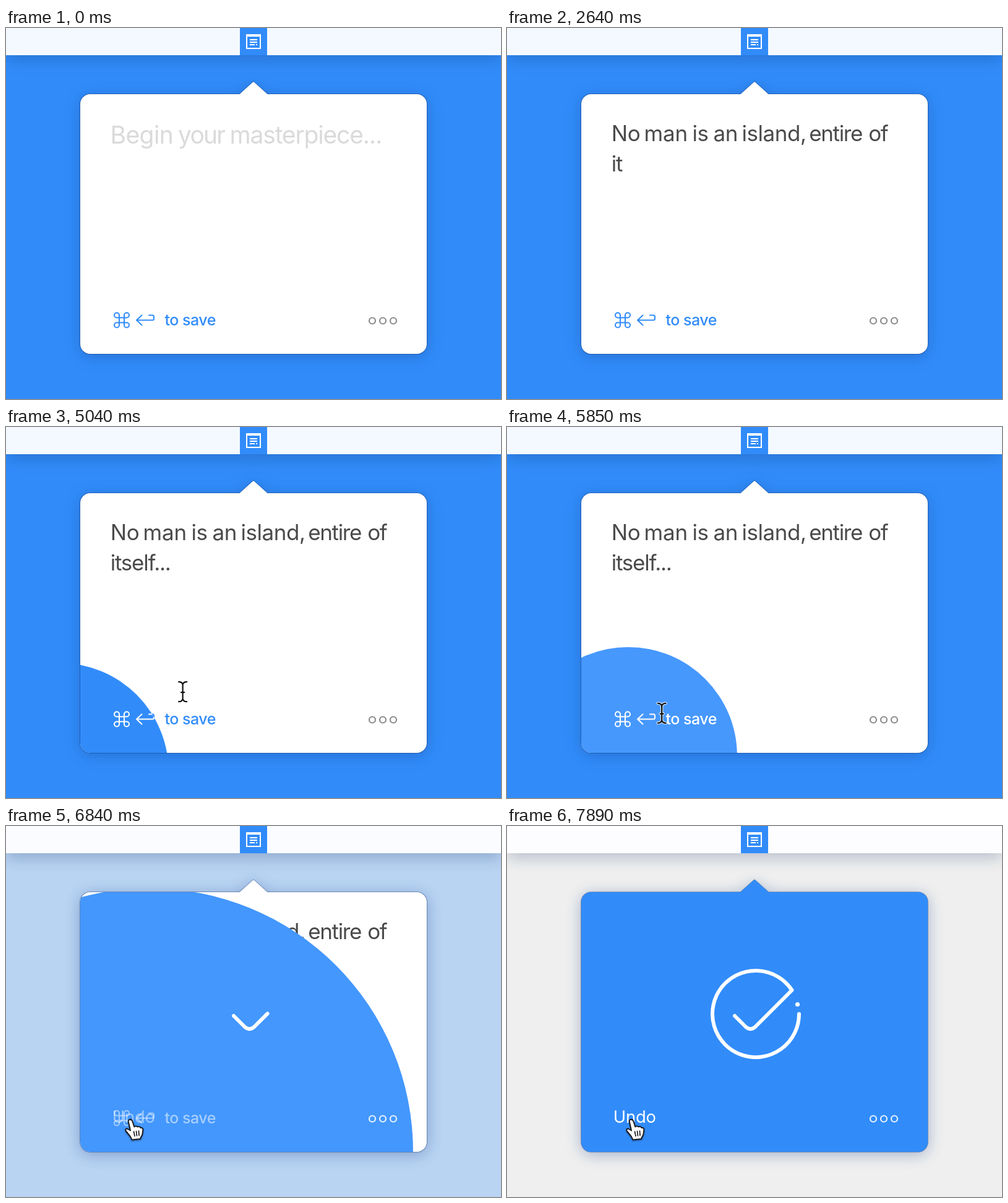
Recreate the animation shown at these times as an HTML page. Size 800 by 600 pixels, loop 9 s.

```html
<!DOCTYPE html>
<html lang="en">
<head>
<meta charset="utf-8">
<title>Quick note</title>
<style>
html, body { margin: 0; width: 100%; height: 100%; overflow: hidden; background: #318cfa; }
svg { display: block; width: 100%; height: 100%; }
text { font-family: Inter, "Liberation Sans", sans-serif; font-optical-sizing: none; white-space: pre; }
.line { fill: none; stroke: currentColor; stroke-width: 2; }
.round { stroke-linecap: round; stroke-linejoin: round; }
</style>
</head>
<body>
<svg viewBox="0 0 800 600" xmlns="http://www.w3.org/2000/svg">
  <defs>
    <path id="shape" d="M136 107H377.500L398.500 88Q400 86.500 401.500 88L422.500 107H664A16 16 0 0 1 680 123V511A16 16 0 0 1 664 527H136A16 16 0 0 1 120 511V123A16 16 0 0 1 136 107Z"/>
    <clipPath id="inCard"><use href="#shape"/></clipPath>
    <clipPath id="inDisc"><circle id="hole"/></clipPath>
    <filter id="soft" filterUnits="userSpaceOnUse" x="-60" y="-60" width="920" height="720">
      <feGaussianBlur stdDeviation="12"/>
    </filter>
    <filter id="lift" x="-50%" y="-50%" width="200%" height="200%">
      <feDropShadow dx="0" dy="1.5" stdDeviation="1.2" flood-opacity=".35"/>
    </filter>
    <g id="save">
      <path class="line" style="stroke-width:1.5" transform="translate(171 456.500) scale(1.3333)" d="M18 3a3 3 0 0 0-3 3v12a3 3 0 1 0 3-3H6a3 3 0 1 0 3 3V6a3 3 0 1 0-3 3h12a3 3 0 0 0 0-6z"/>
      <path class="line round" d="M219.500 464.500L211 472.500L219.500 480.500M211 472.500H236.500Q239 472.500 239 470V467Q239 464.500 236.500 464.500H231"/>
      <g fill="currentColor" font-size="25" font-weight="500" letter-spacing="-.02em">
        <text x="256.500" y="481">to</text><text x="285" y="481">save</text>
      </g>
    </g>
    <g id="more" class="line" style="stroke-width:2.200">
      <circle cx="592" cy="473.500" r="5"/><circle cx="609" cy="473.500" r="5"/><circle cx="626" cy="473.500" r="5"/>
    </g>
  </defs>

  <rect id="back" width="800" height="600"/>
  <rect y="8" width="800" height="44" fill="#0a2a5c" opacity=".24" filter="url(#soft)"/>
  <rect id="bar" width="800" height="44"/>
  <rect x="378" width="44" height="44" fill="#318cfa"/>
  <g fill="#fff">
    <path fill-rule="evenodd" d="M388 10H412V34H388ZM390 14V32H410V14Z"/>
    <path d="M394 18h12v2h-12zM394 22h12v2h-12zM394 26h8v2h-8zM404 26h2v2h-2z"/>
  </g>

  <use href="#shape" y="4" fill="#123c86" opacity=".36" filter="url(#soft)"/>
  <use href="#shape" fill="none" stroke="#0a3272" stroke-opacity=".5" stroke-width="1.600"/>
  <use id="card" href="#shape"/>

  <g id="hint" fill="#dadada" font-size="39">
    <text x="168.500" y="187" letter-spacing="-.015em">Begin</text>
    <text x="278" y="187" letter-spacing="-.045em">your</text>
    <text x="361.500" y="187" letter-spacing="-.030em">masterpiece...</text>
  </g>
  <g id="note" fill="#4a4a4a" font-size="35"></g>
  <rect id="caret" width="2.400" fill="#6a6a6a"/>
  <use href="#save" color="#318cfa"/>
  <use href="#more" color="#8c8c8c"/>

  <g clip-path="url(#inCard)">
    <circle id="disc"/>
    <g clip-path="url(#inDisc)" color="#fff">
      <use id="saveLit" href="#save"/>
      <text id="undo" x="171.800" y="480" font-size="27.500" fill="#fff" letter-spacing="-.01em">Undo</text>
      <use href="#more" opacity=".88"/>
    </g>
  </g>

  <path id="tick" class="round" fill="none" stroke="#fff" stroke-width="6" d="M368 307L386 325Q393.500 331.500 401 325L460.500 265.500A70 70 0 1 0 472 304"/>
  <circle id="dot" cx="469.500" cy="288.500" fill="#fff"/>
  <path id="spark" class="round" fill="none" stroke="#fff" stroke-width="2.500"/>

  <g id="beam" fill="none" stroke-linecap="round">
    <path id="beamPath" stroke="#fff" stroke-width="4.500" stroke-opacity=".8" d="M-6.500-16Q-1-16 0-11.500Q1-16 6.500-16M0-11.500V11.500M-6.500 16Q-1 16 0 11.500Q1 16 6.500 16M-2.500 1H2.500"/>
    <use href="#beamPath" id="beamInk"/>
    <path stroke="#111" stroke-width="2.200" d="M-6.500-16Q-1-16 0-11.500Q1-16 6.500-16M0-11.500V11.500M-6.500 16Q-1 16 0 11.500Q1 16 6.500 16M-2.500 1H2.500"/>
  </g>
  <g id="hand" class="round" filter="url(#lift)" stroke="#1b1b22">
    <path fill="#fff" stroke-width="2" d="M-3 2Q-4-2-.500-2.500Q2.500-2.500 3.500 1L6.300 9.500Q9 7 11.500 9.500Q15 8 16.500 11Q20 10.500 20.500 14L19.500 21Q18.500 25 16.500 27V29L2.500 30.500Q1 26 -3 21.500L-7.500 16Q-8.500 12.500-5 12.500L0 15.500Z"/>
    <path fill="none" stroke-width="1.700" d="M5.500 17L7 24.500M9.500 16.500L10.500 24M13.500 16L14 23.500"/>
  </g>
</svg>
<script>
const $ = id => document.getElementById(id);
const LOOP = 9000, R = 176;
const BLUE = [49, 140, 250], LIGHT = [83, 160, 255];

const clamp = v => Math.max(0, Math.min(1, v));
const span = (t, a, b) => clamp((t - a) / (b - a));
const mix = (a, b, p) => a + (b - a) * p;
const blend = (a, b, p) => a.map((v, i) => mix(v, b[i], p));
const rgb = c => `rgb(${c.map(Math.round)})`;
const outQuad = p => 1 - (1 - p) ** 2;
const inOut = p => (1 - Math.cos(Math.PI * p)) / 2;
const outBack = p => 1 + 3.600 * (p - 1) ** 3 + 2.600 * (p - 1) ** 2;

function set(id, attrs) {
  for (const k in attrs) $(id).setAttribute(k, attrs[k]);
}

// piecewise linear: keys are [time, value]
function track(t, keys) {
  if (t < keys[0][0]) return 0;
  for (let i = 1; i < keys.length; i++) {
    const [t0, v0] = keys[i - 1], [t1, v1] = keys[i];
    if (t < t1) return mix(v0, v1, (t - t0) / (t1 - t0));
  }
  return keys[keys.length - 1][1];
}

// word, x, y, tracking in em
const words = [
  ["No", 0, 0, -.01], ["man", 52.7, 0, -.005], ["is", 130.7, 0, -.01], ["an", 164.7, 0, -.01],
  ["island,", 210.7, 0, -.013], ["entire", 319.5, 0, -.04], ["of", 415.4, 0, -.04], ["itself...", 0, 48.5, -.036]
].map(([word, x, y, gap]) => {
  const node = document.createElementNS("http://www.w3.org/2000/svg", "text");
  node.setAttribute("x", x);
  node.setAttribute("y", y);
  node.setAttribute("letter-spacing", gap + "em");
  $("note").append(node);
  return { word, node };
});
const typing = [[750, 1], [1620, 14], [1680, 15], [2580, 32], [2640, 33], [2990, 40]];
const tickLength = $("tick").getTotalLength();

function drawText(t) {
  const out = span(t, 90, 540);
  set("hint", { transform: `translate(${170 * outQuad(out)} 0)`, opacity: 1 - out });

  let left = Math.floor(track(t, typing) + .001);
  for (const { word, node } of words) {
    node.textContent = word.slice(0, Math.max(0, left));
    left -= word.length + 1;
  }
  const shrink = inOut(span(t, 2250, 2370));
  set("note", { transform: `translate(168.8 ${mix(185, 183, shrink)}) scale(${mix(40 / 36, 1, shrink)})` });

  if (t < 750) {
    set("caret", { x: 172, y: 151 + 41 * (outBack(out) - 1), height: 44, opacity: clamp(out * 3) });
  } else {
    const on = span(t, 3030, 3090) - span(t, 3270, 3360) + span(t, 3630, 3720) - span(t, 3900 + 30, 3990);
    set("caret", { x: 275, y: 197.5, height: 41, opacity: on });
  }
}

function drawPointer(t) {
  const a = outQuad(span(t, 4170, 4620)), b = outQuad(span(t, 4890, 5280)), c = inOut(span(t, 5700, 6090));
  const x = mix(mix(mix(297, 305, a), 274, b), 201, c);
  const y = mix(mix(mix(340, 382, a), 456, b), 477, c);
  const over = c > .45;
  set("beam", { transform: `translate(${x} ${y})`, opacity: over ? 0 : span(t, 4170, 4320) });
  set("hand", { transform: `translate(${x} ${y})`, opacity: over ? 1 : 0 });
}

function drawDisc(t, saved) {
  const a = outQuad(span(t, 4170, 4620)), b = outQuad(span(t, 4890, 5280)), c = outQuad(span(t, 5700, 6090));
  const place = {
    cx: mix(mix(mix(-70, 5, a), 136, b), 232, c),
    cy: mix(mix(mix(660, 585, a), 541, b), 526.5, c),
    r: mix(R, 709, saved)
  };
  set("disc", place);
  set("hole", place);
  const tone = blend(blend(BLUE, LIGHT, c), BLUE, saved);
  set("disc", { fill: rgb(tone) });
  set("card", { fill: saved === 1 ? rgb(BLUE) : "#fff" });
  set("saveLit", { opacity: 1 - saved });
  set("undo", { opacity: saved });
}

function drawTick(t) {
  const drawn = tickLength * inOut(span(t, 6630, 7500));
  set("tick", { "stroke-dasharray": `${drawn} ${tickLength + 20}`, opacity: drawn > 0 ? 1 : 0 });

  set("dot", { r: Math.max(0, 3.6 * outBack(span(t, 7530, 7770))) });
  const p = span(t, 7530, 7890);
  const far = mix(8, 38, outQuad(p)), near = mix(8, 37, p);
  let d = "";
  for (let i = 0; i < 6; i++) {
    const ux = Math.cos(i * Math.PI / 3), uy = Math.sin(i * Math.PI / 3);
    d += `M${469.5 + near * ux} ${283 + near * uy}L${469.5 + far * ux} ${283 + far * uy}`;
  }
  set("spark", { d, opacity: p > 0 && p < 1 ? 1 - p * p : 0 });
}

function render(t) {
  const saved = span(t, 6630, 7080);
  const bright = outQuad(saved);
  set("back", { fill: rgb(blend(BLUE, [239, 239, 239], bright)) });
  set("bar", { fill: rgb(blend([244, 249, 255], [253, 253, 255], bright)) });
  drawText(t);
  drawDisc(t, saved);
  drawTick(t);
  drawPointer(t);
}

$("beamInk").remove();
const start = performance.now();
function tick() {
  render((performance.now() - start) % LOOP);
  requestAnimationFrame(tick);
}
render(0);
requestAnimationFrame(tick);
</script>
</body>
</html>
```
